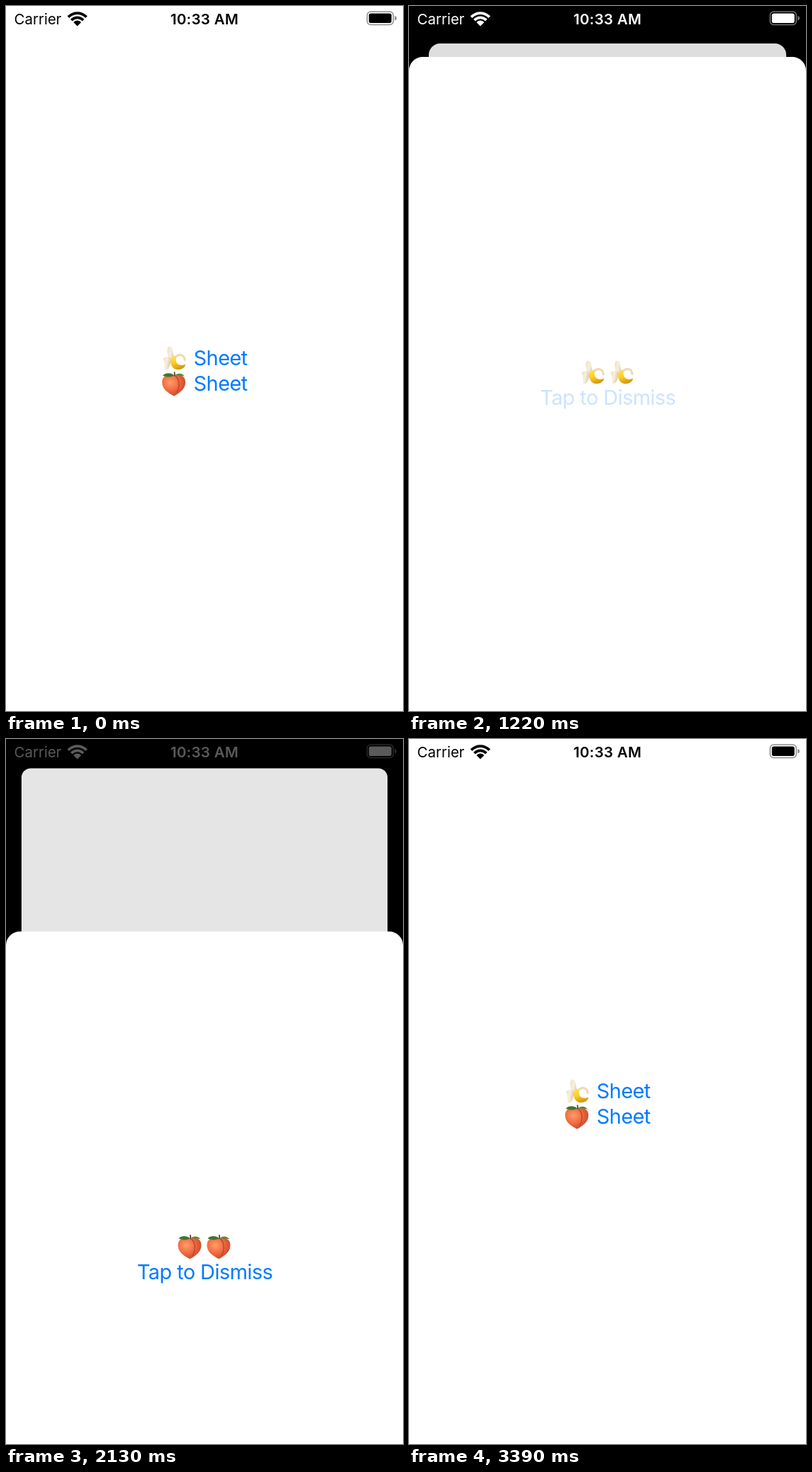
Animation of 562x997 px, one loop 3.45 s. Source, as an HTML page:

```html
<!DOCTYPE html>
<html lang="en">
<head>
<meta charset="utf-8">
<title>Two sheets</title>
<style>
  html, body { margin: 0; width: 100%; height: 100%; overflow: hidden; background: #000; }
  svg { display: block; width: 100vw; height: 100vh; }
  text { font-family: Inter, Roboto, sans-serif; }
  .link { font-size: 29px; letter-spacing: -.55px; fill: #007aff; }
  .status { font-size: 20.5px; fill: currentColor; }
  .clock { font-weight: 600; letter-spacing: .35px; text-anchor: middle; }
  .mid { text-anchor: middle; }
</style>
</head>
<body>
<svg viewBox="0 0 562 997">
  <defs>
    <radialGradient id="skin" cx=".36" cy=".36" r=".72">
      <stop offset="0" stop-color="#ff9d6a"/>
      <stop offset=".5" stop-color="#f06c42"/>
      <stop offset="1" stop-color="#c6432a"/>
    </radialGradient>
    <linearGradient id="peel" x1="0" y1="0" x2=".4" y2="1">
      <stop offset="0" stop-color="#ffe65c"/>
      <stop offset=".55" stop-color="#fbcb25"/>
      <stop offset="1" stop-color="#d79a10"/>
    </linearGradient>
    <linearGradient id="cream" x1="0" y1="0" x2="1" y2=".3">
      <stop offset="0" stop-color="#e9dcc4"/>
      <stop offset=".5" stop-color="#f8f0df"/>
      <stop offset="1" stop-color="#dfcba6"/>
    </linearGradient>

    <g id="peach">
      <path fill="url(#skin)" d="M2-11.500C7-15 16-12 16.500-3C17 7 8 13 .5 17C-8 13-17 7-16.500-3C-16-13-6-14 2-11.500Z"/>
      <path fill="none" stroke="#b5432b" stroke-width="1.300" stroke-linecap="round" d="M3-11C8.500-5 8.500 5 4 12"/>
      <path fill="#41762c" d="M1-12C-4-16-11-16.500-15.500-12C-10-9-4-9.500 1-12Z"/>
      <path fill="#568b36" d="M2-12.500C6-16 12-15.500 15.500-11C10-12 6-11.500 2-12.500Z"/>
      <path fill="none" stroke="#4c3420" stroke-width="1.700" d="M1.500-11L1-17"/>
    </g>
    <g id="banana">
      <path fill="url(#cream)" d="M-9.500-13C-9-17.500-3.500-18-2.500-13C-2-8-1-4 1 0L-6 4C-9-2-10-8-9.500-13Z"/>
      <path fill="url(#peel)" d="M-5 1C-2-3 1-4 4-3C1 2 3 8 8 9.500C11 10.500 14 9.500 16 8.500C16 14 9 17 3 16C-3 14.500-6 8-5 1Z"/>
      <path fill="none" stroke="#ecdab4" stroke-width="3.200" stroke-linecap="round" d="M3-2.500C8-7 14.500-4 15 2.500"/>
      <path fill="url(#cream)" d="M-7-2C-12-2-15-1-15.500 1C-13 5-13.500 11-13.500 16C-10 18-6 13-5 6C-4 2-5-1-7-2Z"/>
    </g>
    <clipPath id="wedge"><path d="M101 28.500L81 8.500V0H121V8.500Z"/></clipPath>
  </defs>

  <rect width="562" height="997"/>

  <g id="back">
    <rect class="page" width="562" height="997" fill="#fff"/>
    <g id="open0">
      <use href="#banana" x="238" y="498"/>
      <text class="link" x="265.500" y="508.300">Sheet</text>
    </g>
    <g id="open1">
      <use href="#peach" x="237.500" y="534.500"/>
      <text class="link" x="265.500" y="544.300">Sheet</text>
    </g>
    <rect class="page" id="dim" width="562" height="997"/>
  </g>

  <g id="sheet">
    <rect width="562" height="960" rx="19.500" fill="#fff"/>
    <use class="fruit" x="260" y="446"/>
    <use class="fruit" x="301" y="446"/>
    <text class="link mid" id="close" x="281.500" y="491.500">Tap to Dismiss</text>
  </g>

  <g id="bar">
    <text class="status" x="11.500" y="25.500">Carrier</text>
    <g clip-path="url(#wedge)" fill="none" stroke="currentColor" stroke-width="3.800">
      <circle cx="101" cy="27.500" r="17.400"/>
      <circle cx="101" cy="27.500" r="11.200"/>
      <circle cx="101" cy="27.500" r="3.500" stroke-width="7"/>
    </g>
    <text class="status clock" x="281" y="25.500">10:33 AM</text>
    <rect x="511.250" y="8" width="37" height="18.500" rx="5" fill="none" stroke="currentColor" stroke-width="1.500" opacity=".45"/>
    <rect x="513.700" y="10.400" width="32" height="13.700" rx="2.800" fill="currentColor"/>
    <path d="M550.200 14a3.300 3.300 0 0 1 0 6.500Z" fill="currentColor" opacity=".45"/>
  </g>
</svg>

<script>
const LOOP = 3450, TOP = 72, BOTTOM = 997;
const RATE = 0.019;      // spring rate per ms
const SETTLE = 460, BAR_FADE = 380;

const visits = [
  { fruit: '#banana', press: 320, show: 470, tap: 1220, hide: 1326.5 },
  { fruit: '#peach', press: 1970, show: 1979, tap: 2790, hide: 2898.5 }
];

const $ = id => document.getElementById(id);
const back = $('back'), sheet = $('sheet'), bar = $('bar');
const pages = document.querySelectorAll('.page');
const fruits = document.querySelectorAll('.fruit');
const clamp = v => Math.min(1, Math.max(0, v));

// critically damped spring from 0 to 1
function spring(ms) {
  if (ms <= 0) return 0;
  if (ms >= SETTLE) return 1;
  const x = RATE * ms;
  return 1 - (1 + x) * Math.exp(-x);
}

function smooth(ms) {
  const u = clamp(ms / BAR_FADE);
  return u * u * (3 - 2 * u);
}

// a pressed label dims at once, then recovers after release
function pressed(t, down, up) {
  return t < down ? 1 : 0.2 + 0.8 * clamp((t - up - 20) / 220);
}

function draw(t) {
  const visit = visits[t < visits[1].press ? 0 : 1];
  const p = spring(t - visit.show) - spring(t - visit.hide);
  const scale = 1 - 0.0996 * p;

  back.setAttribute('transform',
    `translate(281 ${498.5 + 3.3 * p}) scale(${scale}) translate(-281 -498.5)`);
  pages.forEach(r => r.setAttribute('rx', 18 * p));
  $('dim').setAttribute('opacity', 0.129 * p);

  sheet.setAttribute('transform', `translate(0 ${BOTTOM - (BOTTOM - TOP) * p})`);
  sheet.style.visibility = p > 0 ? 'visible' : 'hidden';
  fruits.forEach(f => f.setAttribute('href', visit.fruit));

  visits.forEach((v, i) => $('open' + i).setAttribute('opacity', pressed(t, v.press, v.show)));
  $('close').setAttribute('opacity', pressed(t, visit.tap, visit.hide));

  const light = Math.round(255 * (smooth(t - visit.show) - smooth(t - visit.hide)));
  bar.style.color = `rgb(${light},${light},${light})`;
}

function tick() {
  draw(performance.now() % LOOP);
  requestAnimationFrame(tick);
}
tick();
</script>
</body>
</html>
```
